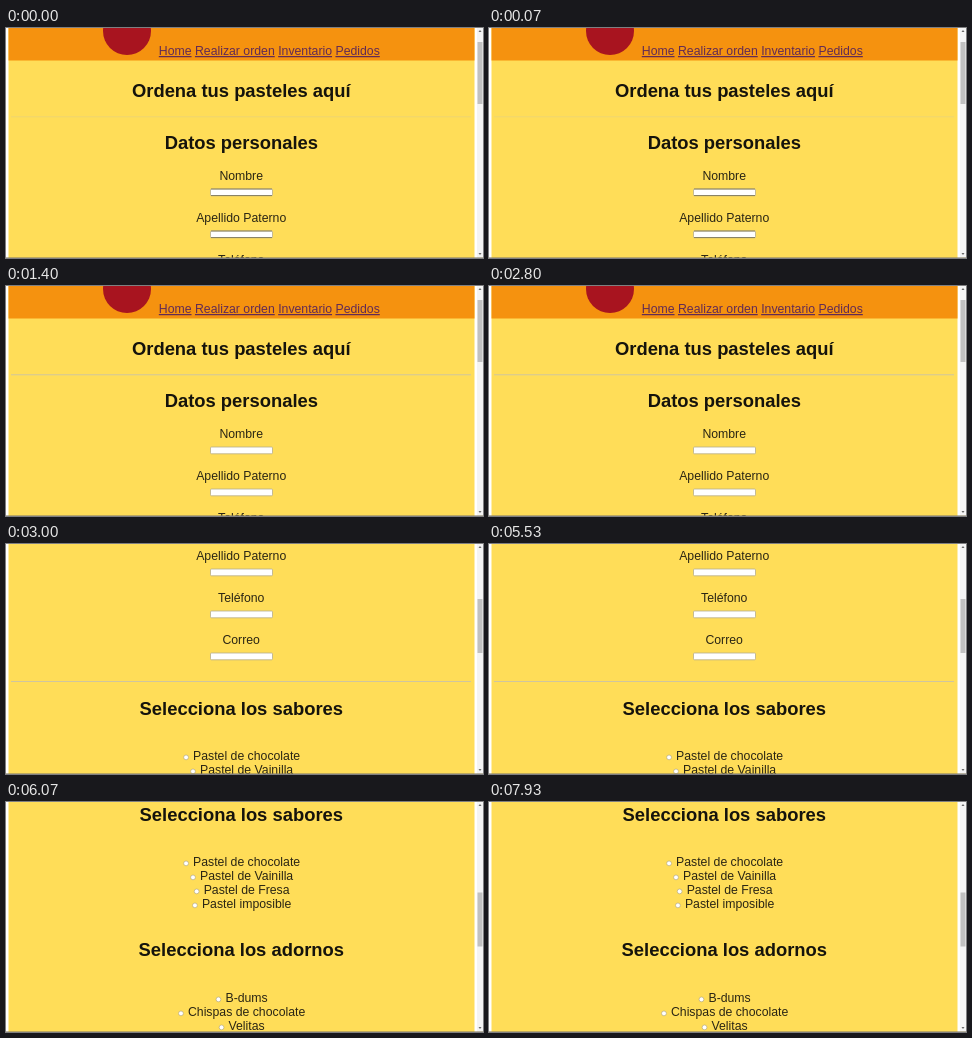
An HTML page for the animation above (8 s loop, 477 by 230 pixels).

```html
<!DOCTYPE html>
<html lang="es">
<head>
<meta charset="utf-8">
<title>Ordena tus pasteles</title>
<style>
html, body { margin: 0; width: 100%; height: 100%; overflow: hidden; background: #fff; }
svg { display: block; width: 477px; height: 230px; }
text { font: 12.27px "Liberation Sans", Arial, sans-serif; fill: #2b2614; text-anchor: middle; }
.title { font-size: 18.4px; font-weight: bold; fill: #15130c; }
.link { fill: #622b55; text-decoration: underline; }
</style>
</head>
<body>
<svg viewBox="0 0 477 230">
  <rect x="2.5" width="466" height="230" fill="#ffdd58"/>
  <g id="page">
    <rect x="2.5" width="466" height="32.5" fill="#f5920f"/>
    <circle cx="121" cy="3" r="24" fill="#a8141f"/>
    <text x="263.3" y="27"><tspan class="link">Home</tspan> <tspan class="link">Realizar orden</tspan> <tspan class="link">Inventario</tspan> <tspan class="link">Pedidos</tspan></text>
  </g>
  <rect x="471" width="6" height="230" fill="#f4f4f4"/>
  <rect id="thumb" x="471.5" width="5" height="54" fill="#c1c1c1"/>
  <path d="M472.5 4l1.5-2 1.5 2zM472.5 225l1.5 2 1.5-2z" fill="#666"/>
  <rect y="229" width="477" height="1" fill="#8c8468" opacity=".6"/>
</svg>
<script>
const page = document.getElementById("page");
const thumb = document.getElementById("thumb");

function add(tag, attrs, label = "") {
  const el = document.createElementNS("http://www.w3.org/2000/svg", tag);
  for (const key in attrs) el.setAttribute(key, attrs[key]);
  el.textContent = label;
  page.append(el);
  return el;
}

const title = (label, y) => add("text", { x: 235.3, y, class: "title" }, label);
const rule = y => add("rect", { x: 5, y, width: 460, height: 1, fill: "#cfc59f" });

function field(label, y) {
  add("text", { x: 235.2, y }, label);
  add("rect", { x: 204.5, y: y + 9, width: 62, height: 6.8, rx: 1, fill: "#fff", stroke: "#b5ad8c", "stroke-width": 0.8 });
  return add("path", { d: `M205 ${y + 9}h61M205 ${y + 15.5}h61`, stroke: "#777055", "stroke-width": 0.8 });
}

function option(label, y) {
  const text = add("text", { x: 240.6, y }, label);
  const cx = 240.6 - text.getComputedTextLength() / 2 - 7;
  add("circle", { cx, cy: y - 2.6, r: 2.4, fill: "#fff", stroke: "#a9a07c", "stroke-width": 0.6 });
}

title("Ordena tus pasteles aquí", 69);
const firstRule = rule(88.3);
title("Datos personales", 121.3);
const edges = ["Nombre", "Apellido Paterno", "Teléfono", "Correo"].map((s, i) => field(s, 152 + 42 * i));
rule(315);
title("Selecciona los sabores", 348.5);
["Pastel de chocolate", "Pastel de Vainilla", "Pastel de Fresa", "Pastel imposible"]
  .forEach((s, i) => option(s, 394 + 14 * i));
title("Selecciona los adornos", 484.3);
["B-dums", "Chispas de chocolate", "Velitas"].forEach((s, i) => option(s, 530 + 14 * i));

// [start time, page scroll, thumb top]
const stops = [[0, 0, 14], [3000, 178, 55], [6000, 330, 90.5]];
const start = performance.now();

function draw(now) {
  const t = Math.max(0, now - start) % 8000;
  const [, scroll, top] = stops.findLast(s => t >= s[0]);
  page.setAttribute("transform", `translate(0 ${-scroll})`);
  thumb.setAttribute("y", top);
  thumb.setAttribute("height", scroll ? 54 : 62);
  const settled = Math.min(1, Math.max(0, (t - 70) / 500));
  firstRule.setAttribute("opacity", 0.35 + 0.65 * settled);
  edges.forEach(e => e.setAttribute("opacity", 1 - settled));
  requestAnimationFrame(draw);
}
draw(start);
</script>
</body>
</html>
```
